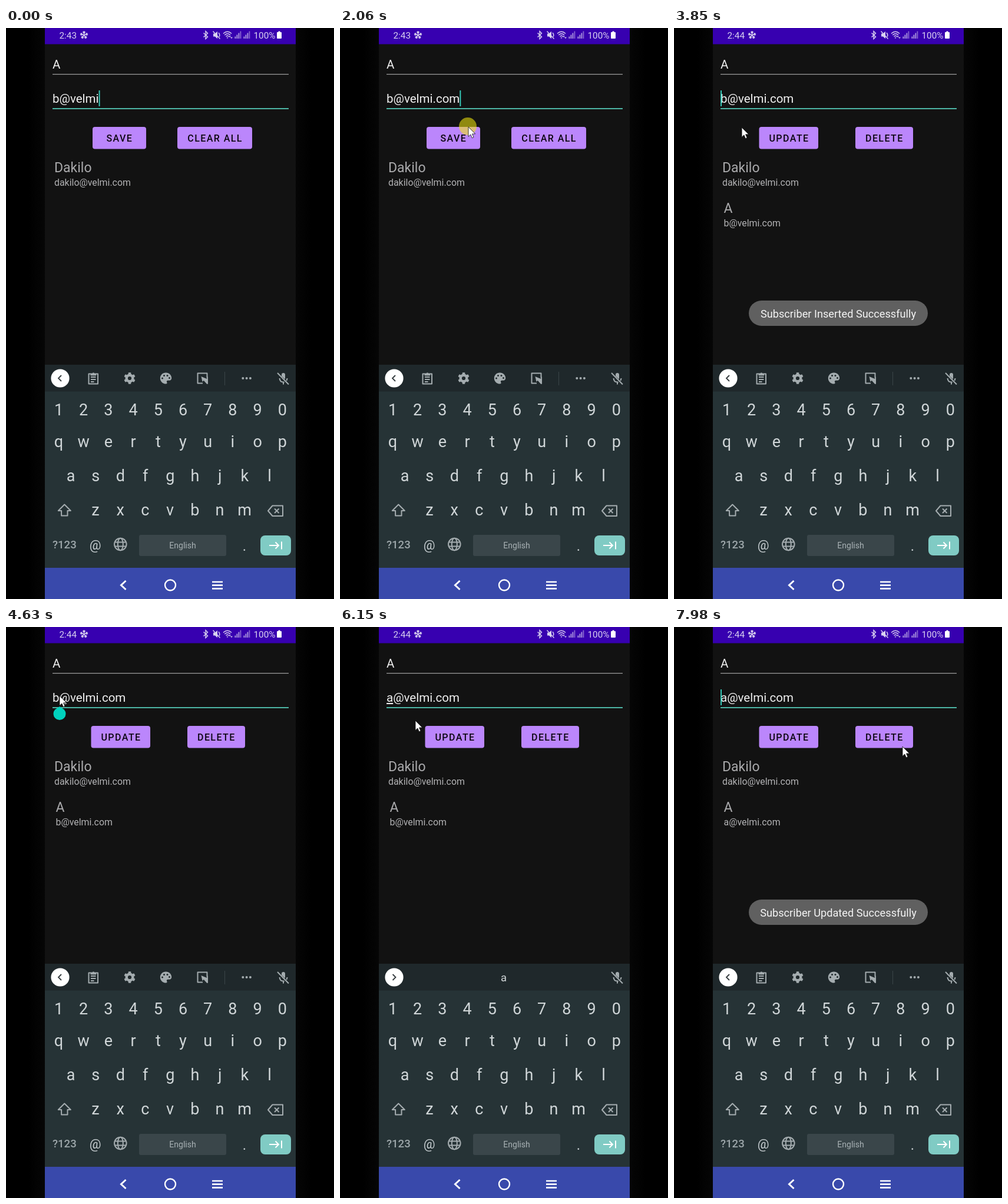
Write an HTML page that moves like this. It is 557x970 px and loops after 8 s.

```html
<!DOCTYPE html>
<html lang="en">
<head>
<meta charset="utf-8">
<title>Subscriber form</title>
<style>
  html, body { margin: 0; width: 100%; height: 100%; overflow: hidden; background: #000; }
  svg { display: block; width: 100%; height: 100%; font-family: Roboto, sans-serif; }
  text { white-space: pre; }
  .mid { text-anchor: middle; }
  .field { font-size: 20.5px; fill: #f0f0f0; }
  .field.hint { fill: #7d7b80; }
  .title { font-size: 23px; fill: #a9a9ab; }
  .mail { font-size: 15.9px; fill: #b2b2b4; }
  .button rect { fill: #bb86fc; }
  .button text { font-size: 16px; font-weight: 500; letter-spacing: .0893em; fill: #0c0712; }
  .key { font-size: 27px; fill: #d0d6d8; }
  .line { fill: none; stroke: #a4acaf; stroke-width: 2; stroke-linejoin: round; }
  .solid { fill: #a4acaf; }
  .status { fill: #d9d2f0; font-size: 15.3px; }
  .status .thin { fill: none; stroke: #d9d2f0; stroke-width: 1.4; }
  .nav { fill: none; stroke: #fff; stroke-width: 2.4; }
</style>
</head>
<body>
<svg viewBox="0 0 557 970">
  <defs>
    <linearGradient id="edge">
      <stop offset="0" stop-color="#000"/>
      <stop offset=".07" stop-color="#000"/>
      <stop offset=".12" stop-color="#060606"/>
      <stop offset=".88" stop-color="#060606"/>
      <stop offset=".93" stop-color="#000"/>
      <stop offset="1" stop-color="#000"/>
    </linearGradient>
  </defs>
  <rect width="557" height="970" fill="url(#edge)"/>
  <rect x="66" width="426" height="918" fill="#121212"/>
  <rect x="66" width="426" height="27.5" fill="#3700b0"/>

  <g class="status">
    <text id="clock" x="90.5" y="17.5"></text>
    <g id="flower" class="thin"></g>
    <path class="thin" d="M335.5 8.5l7 6.5-3.5 3.5V5.5l3.5 3.5-7 6.5"/>
    <path d="M352 9.5h3l4-3.8v12.6l-4-3.8h-3z"/>
    <path class="thin" d="M351.5 5.5l12 13M361 8q3 4 1 7"/>
    <path class="thin" d="M369 9.5q7-6.5 14 0M371.2 12q5-4.5 9.8 0M373.5 14.5q2.5-2.3 5 0"/>
    <path d="M374.5 16h3l-1.5 2zM380 13l2 2.3h-4zM383 18l-2-2.3h4z"/>
    <g id="bars"></g>
    <text x="420.5" y="17.5">100%</text>
    <path fill="#fff" d="M460 8q0-1 1-1h1.5V5.5h3V7h1.5q1 0 1 1v9q0 1-1 1h-6q-1 0-1-1z"/>
  </g>

  <text id="name" class="field" x="79" y="69"></text>
  <rect x="79" y="78" width="401" height="1.2" fill="#a0a0a0"/>
  <text id="email" class="field" x="79" y="127"></text>
  <rect x="79" y="136" width="401" height="2" fill="#4db5a4"/>
  <rect id="caret" y="106" width="2" height="27" fill="#35c9b8"/>

  <g id="saving" class="button">
    <rect x="147" y="168" width="91" height="37.5" rx="4"/><text x="170.5" y="193">SAVE</text>
    <rect x="291" y="168" width="127" height="37.5" rx="4"/><text x="308.3" y="193">CLEAR ALL</text>
  </g>
  <g id="editing" class="button">
    <rect x="144.500" y="168" width="100.500" height="37.500" rx="4"/><text x="161.500" y="193">UPDATE</text>
    <rect x="308" y="168" width="98" height="37.5" rx="4"/><text x="325" y="193">DELETE</text>
  </g>
  <path id="handle" fill="#00d2bd" d="M91 135l7.600 5.300a10.500 10.500 0 1 1-15.200 0z"/>

  <text class="title" x="82" y="245">Dakilo</text>
  <text class="mail" x="82" y="268">dakilo@velmi.com</text>
  <g id="second">
    <text class="title" x="84.500" y="314">A</text>
    <text id="secondMail" class="mail" x="84.500" y="337"></text>
  </g>
  <g id="toast">
    <rect x="127" y="463" width="304" height="43" rx="21.500" fill="#606060"/>
    <text id="message" class="mid" x="279" y="492" font-size="18.200" fill="#f4f4f4"></text>
  </g>

  <rect x="66" y="572" width="426" height="46" fill="#1f282b"/>
  <rect x="66" y="617.500" width="426" height="300" fill="#263336"/>
  <circle cx="92" cy="595" r="15.600" fill="#fff"/>
  <path id="chevron" fill="none" stroke="#333a3d" stroke-width="1.800"/>
  <g id="tools">
    <path class="line" d="M140.500 587.500h15.500v17h-15.500zM144 593h8.500M144 597h8.500M144 601h5.500"/>
    <path class="solid" d="M143.500 587h3a2 2 0 0 1 3.800 0h3v3.500h-9.800z"/>
    <g id="gear"></g>
    <path class="solid" d="M271.500 585.500c-5.500 0-9.700 4.200-9.700 9.500s4.300 9.600 9.700 9.600c2 0 2.500-1.700 1.700-2.900-1-1.500 0-3 1.800-3h2.500c2.200 0 3.700-1.700 3.700-4 0-5-4.300-9.200-9.700-9.200z"/>
    <g fill="#1f282b"><circle cx="265.500" cy="595" r="1.500"/><circle cx="268.500" cy="590.500" r="1.500"/><circle cx="274" cy="590.500" r="1.500"/><circle cx="277.500" cy="594.500" r="1.500"/></g>
    <path class="line" d="M334 603.500h-8.500v-17h16v8"/>
    <path class="solid" d="M331.500 592l2 9 2.200-2.200 5.300 6h2v-13l-2 4-2.500-.8z"/>
    <path d="M371.500 584v23" stroke="#3a4447"/>
    <g class="solid"><circle cx="402.300" cy="595" r="2"/><circle cx="408.600" cy="595" r="2"/><circle cx="414.900" cy="595" r="2"/></g>
  </g>
  <text id="suggestion" class="mid" x="278" y="602" font-size="18.500" fill="#d0d6d8">a</text>
  <rect class="solid" x="468" y="586" width="6" height="12" rx="3"/>
  <path class="line" stroke-width="1.700" d="M464.500 595q.5 6.500 6.500 6.500t6.500-6.500M471 601.500v4"/>
  <path d="M461 587.500l19 18" stroke="#1f282b" stroke-width="4"/>
  <path class="line" d="M461 586l19 19.500"/>

  <g id="keys"></g>
  <path class="line" stroke="#c5cccf" d="M99.300 809.500l10.500 10.500h-5.300v8.500h-10.400v-8.500h-5.300z"/>
  <path class="line" d="M452.500 811.500h17.500v17.500h-17.500l-7.500-8.750zM456 816.500l7.500 7.500m0-7.500l-7.500 7.500"/>
  <text x="79" y="884" font-size="18.600" font-weight="500" fill="#9da7aa">?123</text>
  <text class="mid" x="151.700" y="886" font-size="22" fill="#c5cccf">@</text>
  <g class="line" stroke-width="1.600"><circle cx="194.300" cy="877" r="10.300"/><ellipse cx="194.300" cy="877" rx="4.500" ry="10.300"/><path d="M185 873.500h18.600M185 880.500h18.600"/></g>
  <rect x="226" y="861" width="148" height="36" rx="3" fill="#3a464a"/>
  <text class="mid" x="300" y="884" font-size="14" fill="#a9b2b5">English</text>
  <text class="mid key" x="405" y="888" style="font-size:24px">.</text>
  <rect x="432" y="862" width="52" height="34" rx="8" fill="#80cbc4"/>
  <path d="M447 879h16m-5.500-5.500l5.500 5.500-5.500 5.500M468 872.500v13" fill="none" stroke="#fff" stroke-width="2"/>

  <rect x="66" y="917" width="426" height="53" fill="#3949ab"/>
  <path class="nav" style="stroke-width:3" d="M203.500 939l-8 7.500 8 7.500"/>
  <circle class="nav" cx="279" cy="946.500" r="9"/>
  <path class="nav" style="stroke-width:2.700" d="M350 941h18m-18 5.700h18m-18 5.700h18"/>

  <g id="pointer">
    <circle id="click" cx="-1" cy="-1" r="15" fill="#f5ea0c" opacity=".56"/>
    <path d="M0 0v16.500l3.800-3.600 2.500 5.900 2.700-1.200-2.500-5.700h5.300z" fill="#fff" stroke="#111" stroke-width=".8"/>
  </g>
</svg>
<script>
const LOOP = 8000, BLINK = 500;
const el = id => document.getElementById(id);
const show = (id, on) => el(id).setAttribute('visibility', on ? 'visible' : 'hidden');
const clamp = v => Math.max(0, Math.min(1, v));
const put = (id, value) => { if (el(id).textContent !== value) el(id).textContent = value; };

// Repeated static parts
const rows = [['1234567890', 89.5, 658], ['qwertyuiop', 89.5, 712], ['asdfghjkl', 110, 770], ['zxcvbnm', 152, 828]];
el('keys').innerHTML = rows.map(([keys, x, y]) => [...keys].map((key, i) =>
  `<text class="key mid" x="${x + i * 42.2}" y="${y}">${key}</text>`).join('')).join('');
const around = (n, cx, cy, part) => Array.from({ length: n }, (_, i) =>
  `<g transform="translate(${cx} ${cy}) rotate(${i * 360 / n})">${part}</g>`).join('');
el('flower').innerHTML = around(5, 132.5, 12, '<path d="M0 0V-3M-1.700-5.600L0-3l1.700-2.600"/><circle cy="-4.700" r="1.300"/>');
el('gear').innerHTML = '<circle cx="210" cy="595" r="5.300" fill="none" stroke="#a4acaf" stroke-width="4.400"/>' +
  around(6, 210, 595, '<rect class="solid" x="-2.300" y="-9.700" width="4.600" height="5" rx=".8"/>');
el('bars').innerHTML = [388.5, 403.5].map(x => [0, 1, 2, 3].map(i =>
  `<rect x="${x + i * 3}" y="${14.5 - i * 3}" width="1.800" height="${3.5 + i * 3}" opacity="${i < 3 ? .75 : .5}"/>`).join('')).join('');

// Each step changes part of the form and restarts the caret
const host = '@velmi.com';
const steps = [
  [0, { name: 'A', email: 'b@velmi', caret: 7, edit: false, second: '', handle: false, composing: false }],
  [190, { email: 'b@velmi.', caret: 8 }],
  [380, { email: 'b@velmi.c', caret: 9 }],
  [560, { email: 'b@velmi.co', caret: 10 }],
  [780, { email: 'b' + host, caret: 11 }],
  [2260, { name: '', email: '', caret: 0, second: 'b' + host }],
  [3480, { name: 'A', email: 'b' + host, edit: true }],
  [4110, { caret: 1, handle: true }],
  [5150, { email: host, caret: 0, handle: false }],
  [5570, { email: 'a' + host, caret: 1, composing: true }],
  [6720, { name: '', email: '', caret: 0, edit: false, second: 'a' + host, composing: false }],
  [7520, { name: 'A', email: 'a' + host, edit: true }]
];
const path = [
  [1480, 100, 124], [1950, 218, 168], [2180, 218, 168], [2700, 188, 326], [3500, 188, 326],
  [4020, 91, 117], [5850, 91, 117], [6150, 128, 159], [6400, 176, 197], [6950, 176, 197],
  [7330, 182, 322], [7560, 182, 322], [7940, 388, 203], [LOOP, 388, 203]
];
const clicks = [[2020, 2160], [3380, 3500], [4040, 4150], [6620, 6740], [7420, 7530]];
const toasts = [[2300, 4300, 'Inserted'], [6740, 8800, 'Updated']];

function pointerAt(t) {
  const i = Math.max(1, path.findIndex(p => p[0] > t));
  const [t0, x0, y0] = path[i - 1], [t1, x1, y1] = path[i];
  const u = clamp((t - t0) / (t1 - t0)), k = u * u * (3 - 2 * u);
  return [x0 + (x1 - x0) * k, y0 + (y1 - y0) * k];
}

function setField(id, value, hint) {
  put(id, value || hint);
  el(id).classList.toggle('hint', !value);
}

function render(t) {
  const form = {};
  let since = 0;
  for (const [start, change] of steps) {
    if (start > t) break;
    Object.assign(form, change);
    since = start;
  }
  put('clock', t < 3600 ? '2:43' : '2:44');
  setField('name', form.name, 'Name');
  setField('email', form.email, 'Email');
  const width = form.caret ? el('email').getSubStringLength(0, form.caret) : 0;
  el('caret').setAttribute('x', 79 + width);
  show('caret', (t - since) % (2 * BLINK) < BLINK);
  if (form.composing) el('email').innerHTML = '<tspan text-decoration="underline">a</tspan>' + host;

  show('saving', !form.edit);
  show('editing', form.edit);
  show('handle', form.handle);
  show('second', form.second);
  put('secondMail', form.second);
  show('tools', !form.composing);
  show('suggestion', form.composing);
  el('chevron').setAttribute('d', form.composing ? 'M89.500 590l5 5-5 5' : 'M94 590l-5 5 5 5');

  const toast = toasts.find(([a, b]) => t >= a && t < b);
  show('toast', toast);
  if (toast) {
    put('message', `Subscriber ${toast[2]} Successfully`);
    el('toast').setAttribute('opacity', Math.min(clamp((t - toast[0]) / 210), clamp((toast[1] - t) / 250)));
  }

  // The pointer hides while typing
  const visible = t >= 1480 && t < 4950 || t >= 5850;
  show('pointer', visible);
  show('click', visible && clicks.some(([a, b]) => t >= a && t < b));
  el('pointer').setAttribute('transform', `translate(${pointerAt(t)})`);
}

const origin = performance.now();
function tick() {
  render((performance.now() - origin) % LOOP);
  requestAnimationFrame(tick);
}
tick();
</script>
</body>
</html>
```
